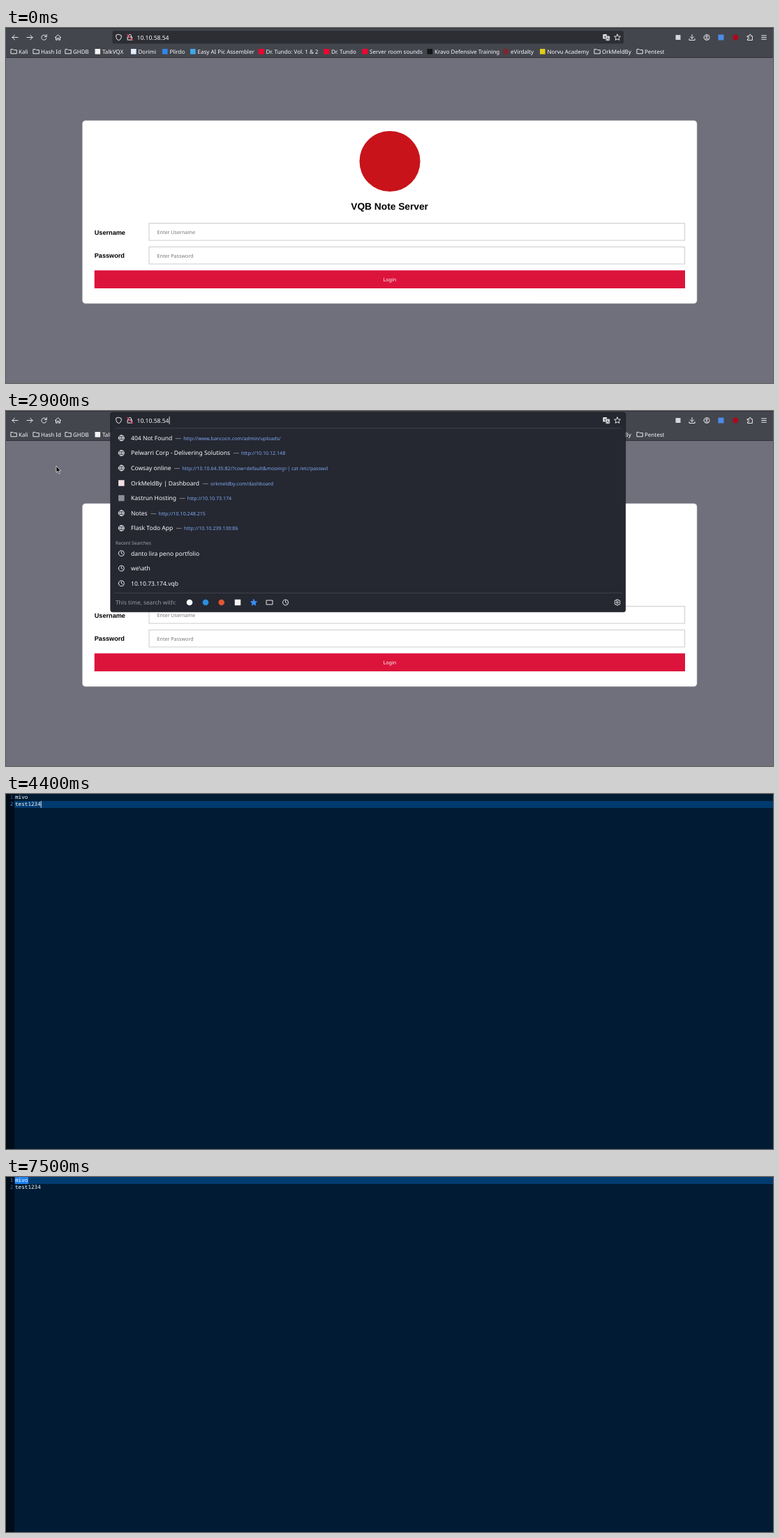
An HTML page that plays this animation: 1099 px wide and 510 px high, repeating every 8 s.

```html
<!DOCTYPE html>
<html lang="en">
<head>
<meta charset="utf-8">
<style>
html, body { margin: 0; width: 100%; height: 100%; overflow: hidden; background: #70707c; }
svg { display: block; width: 100%; height: 100%; }
text { font-family: "Noto Sans", sans-serif; text-rendering: geometricPrecision; white-space: pre; }
.bold { font-family: "Liberation Sans", Arial, sans-serif; font-weight: bold; }
.code { font-family: "Noto Sans Mono", monospace; font-weight: 500; }
.icon { fill: none; stroke: #e9e9ed; stroke-width: 1; stroke-linecap: round; stroke-linejoin: round; }
</style>
</head>
<body>
<svg id="stage" viewBox="0 0 1099 510" preserveAspectRatio="none"></svg>
<script>
const rect = (x, y, w, h, fill, extra = '') =>
  `<rect x="${x}" y="${y}" width="${w}" height="${h}" fill="${fill}" ${extra}/>`;
const text = (x, y, size, fill, body, extra = '') =>
  `<text x="${x}" y="${y}" font-size="${size}" fill="${fill}" ${extra}>${body}</text>`;
const icon = (x, y, d, extra = '') =>
  `<path class="icon" transform="translate(${x} ${y})" d="${d}" ${extra}/>`;
const dot = (x, y, r, fill) => `<circle cx="${x}" cy="${y}" r="${r}" fill="${fill}"/>`;
const square = (x, y, size, fill) => rect(x - size / 2, y - size / 2, size, size, fill);
const group = (id, body) => `<g id="${id}">${body}</g>`;

const shapes = {
  back: 'M4 0H-4M-.7-3.4L-4 0L-.7 3.4',
  forward: 'M-4 0H4M.7-3.4L4 0L.7 3.4',
  reload: 'M3.4-1A3.6 3.6 0 1 0 3.4 1.3M3.7-4V-1H.8',
  home: 'M-4 0L0-3.8L4 0M-3-.8V3.7H-1V1H1V3.7H3V-.8',
  shield: 'M0-4.2L3.7-3V0Q3.4 3 0 4.3Q-3.4 3-3.7 0V-3Z',
  lock: 'M-3-.5H3V3.8H-3ZM-2-.5V-2A2 2 0 0 1 2-2V-.5',
  star: 'M0-4.3L1.3-1.4L4.4-1.1L2.1 1L2.7 4.1L0 2.5L-2.7 4.1L-2.1 1L-4.4-1.1L-1.3-1.4Z',
  download: 'M0-4V1.6M-2.6-.8L0 1.8L2.6-.8M-4 2V4H4V2',
  account: 'M-4 0A4 4 0 1 0 4 0A4 4 0 1 0-4 0M-1.3-1.2A1.3 1.3 0 1 0 1.3-1.2A1.3 1.3 0 1 0-1.3-1.2M-2.4 2.6Q0 .4 2.4 2.6',
  puzzle: 'M-3.5-2H-1V-3A1.2 1.2 0 0 1 1.4-3V-2H3.4V4H-3.5V2H-2.4A1.2 1.2 0 0 0-2.4-.4H-3.5Z',
  menu: 'M-3.3-2.7H3.3M-3.3 0H3.3M-3.3 2.7H3.3',
  folder: 'M-4-3H-1L0-2H4V3.2H-4Z',
  globe: 'M-4 0A4 4 0 1 0 4 0A4 4 0 1 0-4 0ZH4M0-4Q-3.6 0 0 4Q3.6 0 0-4',
  clock: 'M-4 0A4 4 0 1 0 4 0A4 4 0 1 0-4 0M0-2.4V0L1.6 1',
  tab: 'M-4.3-3H4.3V3H-4.3Z',
  gear: 'M-1.3 0A1.3 1.3 0 1 0 1.3 0A1.3 1.3 0 1 0-1.3 0M-1-4H1L1.4-2.8L3-3.2L4-1.3L3.1 0L4 1.3L3 3.2L1.4 2.8L1 4H-1L-1.4 2.8L-3 3.2L-4 1.3L-3.1 0L-4-1.3L-3-3.2L-1.4-2.8Z'
};

// Bookmarks: text start, label, icon colour (none for a folder)
const bookmarks = [
  [18, 'Kali'], [50, 'Hash Id'], [96, 'GHDB'],
  [138, 'TalkVQX', '#f4f4f4'], [189.5, 'Dorimi', '#e3edfb'], [234.5, 'Plirdo', '#2f86e8'],
  [274.5, 'Easy AI Pic Assembler', '#3fa9e8'], [372.5, 'Dr. Tundo: Vol. 1 &amp; 2', '#f5042f'],
  [466, 'Dr. Tundo', '#f5042f'], [521, 'Server room sounds', '#f5042f'],
  [614, 'Kravo Defensive Training', '#151518'], [723, 'eVirdalty', '#7a2633'],
  [775.5, 'Norvu Academy', '#e2cc1c'], [854, 'OrkMeldBy'], [915, 'Pentest']
];

const visited = [
  ['404 Not Found', 'http://www.bancocn.com/admin/uploads/'],
  ['Pelwarri Corp - Delivering Solutions', 'http://10.10.12.148'],
  ['Cowsay online', 'http://10.10.64.35:82/?cow=default&amp;mooing=| cat /etc/passwd'],
  ['OrkMeldBy | Dashboard', 'orkmeldby.com/dashboard', '#f3dfe1'],
  ['Kastrun Hosting', 'http://10.10.73.174', '#8d8f98'],
  ['Notes', 'http://10.10.248.215'],
  ['Flask Todo App', 'http://10.10.239.130:86']
];
const searches = ['danto lira peno portfolio', 'we\\ath', '10.10.73.174.vqb'];

const white = '#fbfbfe';

function toolbar() {
  const buttons = [
    [13, 'back'], [34, 'forward'], [54.5, 'reload'], [74.5, 'home'], [983, 'download'],
    [1004, 'account'], [1066, 'puzzle'], [1086, 'menu']
  ];
  return rect(0, 0, 1099, 42.5, '#44464d') + rect(0, 0, 1099, 1, '#33353c') +
    rect(0, 42, 1099, 1, '#303239') +
    rect(152.5, 4, 732.5, 18.5, '#2d2e34', 'rx="2.5"') +
    buttons.map(([x, name]) => icon(x, 13.5, shapes[name])).join('') +
    square(963, 13.5, 7, '#d5d5da') + square(1024.5, 13.5, 8, '#4b8bea') + dot(1045.3, 13.5, 4, '#a80a1c') +
    bookmarks.map(([x, label, color]) =>
      (color ? square(x - 6.7, 33.8, 7.6, color) : icon(x - 6.7, 33.6, shapes.folder)) +
      text(x, 36.7, 8, white, label)).join('');
}

function form() {
  const field = (y, name) =>
    text(126.7, y + 15.9, 9.16, '#000', name, 'class="bold"') +
    rect(205, y, 767.5, 24.5, '#fff', 'stroke="#ccc" stroke-width="1"') +
    text(216.5, y + 15.3, 7.15, '#757575', 'Enter ' + name);
  return rect(109.5, 133, 880.5, 262.8, '#fff', 'rx="4.5" stroke="#c8c8cc" stroke-width=".6"') +
    dot(550, 191.5, 43.5, '#c8131a') +
    text(549.6, 261, 13.74, '#000', 'VQB Note Server', 'class="bold" text-anchor="middle"') +
    field(280.6, 'Username') + field(314.5, 'Password') +
    rect(126.7, 348.2, 846.3, 25.8, '#dc143c') +
    text(549.8, 364.3, 7.15, '#fff', 'Login', 'text-anchor="middle"');
}

function dropdown() {
  const row = 21.58;
  const footer = [[263, 'white'], [286, '#2b8fe0'], [308.7, '#de5833']];
  return rect(149.7, 2, 738, 286.7, '#252731', 'rx="3" stroke="#15161c" stroke-width=".6"') +
    rect(157, 24.5, 724, .7, '#4a4c56') + rect(155, 261, 728, .7, '#4a4c56') +
    visited.map(([title, url, color], i) => {
      const y = 38.8 + i * row;
      return (color ? square(165.3, y, 8.5, color) : icon(165.3, y, shapes.globe, 'stroke-width=".8"')) +
        text(179, y + 3.1, 8.55, white, title +
          `<tspan dx="4.3" fill="#a9aab2">—</tspan><tspan dx="3" font-size="7.1" fill="#7da9ee">${url}</tspan>`);
    }).join('') +
    text(157, 192, 6.65, '#a5a6ae', 'Recent Searches') +
    searches.map((term, i) => {
      const y = 204.5 + i * row;
      return icon(165.3, y, shapes.clock) + text(179, y + 3.1, 8.55, white, term);
    }).join('') +
    text(157, 278, 8.3, '#9a9ba4', 'This time, search with:') +
    footer.map(([x, color]) => dot(x, 275, 4.3, color)).join('') + square(332, 275, 8.5, '#f2f2f2') +
    icon(355, 275, shapes.star, 'style="fill:#3b8cf5;stroke:#3b8cf5"') +
    icon(377.7, 275, shapes.tab) + icon(400.5, 275, shapes.clock) + icon(876, 275, shapes.gear);
}

function address() {
  return icon(161.5, 13.5, shapes.shield) + icon(177.5, 13.3, shapes.lock) +
    icon(177.5, 13.5, 'M-4-4L4 4', 'style="stroke:#e8355a;stroke-width:1.2"') +
    rect(855.3, 9, 5.8, 6.5, '#e9e9ed', 'rx=".8"') + text(856.4, 14.3, 5.5, '#2d2e34', 'x') +
    rect(859.2, 11.2, 6, 7, '#e9e9ed', 'rx=".8" stroke="#2d2e34" stroke-width=".6"') +
    text(860.2, 17, 6, '#2d2e34', 'A') +
    icon(876, 13.3, shapes.star) +
    rect(187.5, 7.5, 46.5, 11.5, '#2a6fdb', 'id="urlMark"') +
    text(187.5, 16.7, 8.55, white, '10.10.58.54') +
    rect(233.7, 8, .8, 11, white, 'id="urlCaret"');
}

function editor() {
  const line = (y, n, word) =>
    text(5.7, y, 7.67, '#3c7fc8', n, `class="code" id="num${n}"`) +
    text(13, y, 7.67, '#fff', word, 'class="code"');
  return rect(0, 0, 1099, 510, '#001b33') + rect(0, 0, 12, 510, '#000c18') +
    rect(12, 0, 1087, 10, '#003b70', 'id="active"') +
    rect(13, 0, 19, 10, '#2080ee', 'id="mark"') +
    line(7.2, 1, 'mivo') + line(17.4, 2, 'test1234') +
    rect(36.3, 0, .8, 10, '#fff', 'id="caret"');
}

stage.innerHTML =
  group('browser', rect(0, 0, 1099, 510, '#70707c') + form() + toolbar() + group('panel', dropdown()) + address()) +
  group('notes', editor()) +
  '<path id="arrow" fill="#000" stroke="#fff" stroke-width=".7" d="M0 0V9.3L2.1 7.4L3.6 11L5.1 10.3L3.7 6.9H6.5Z"/>' +
  '<path id="beam" fill="none" d="M-2.2-5H-.6Q0-5 0-4.3Q0-5 .6-5H2.2M0-4.5V4.5M-2.2 5H-.6Q0 5 0 4.3Q0 5 .6 5H2.2"/>';

const $ = id => document.getElementById(id);
const show = (id, on) => $(id).setAttribute('display', on ? 'inline' : 'none');
const set = (id, attrs) => { for (const key in attrs) $(id).setAttribute(key, attrs[key]); };
beam.outerHTML = '<g id="beam">' + [['#111', 2.2], ['#fff', .9]].map(([color, width]) =>
  beam.outerHTML.replace('id="beam"', `stroke="${color}" stroke-width="${width}"`)).join('') + '</g>';

// Pointer visits: each is a run of [time, x, y]; the pointer hides after its end
const visits = [
  { end: 3400, keys: [[200, 472, 455], [300, 388, 270], [400, 388, 270], [700, 313, 78], [800, 313, 78],
    [1200, 266, 24], [1500, 243, 11], [1600, 238, 11], [1700, 188, 12], [1900, 161, 6], [2000, 161, 6],
    [2300, 236, 11], [2400, 241, 11], [2600, 180, 32], [2900, 72, 79], [3100, 72, 79], [3300, 140, 18]] },
  { end: 7500, keys: [[4700, 110, 45], [5000, 62, 24], [5200, 43, 7], [5300, 41, 6], [5500, 30, 6],
    [5700, 1, 5], [5800, 1, 5], [6300, 147, 6], [6400, 147, 6], [6700, 32, 4], [6900, 22, 4],
    [7200, 21, 4], [7400, 97, 3]] }
];

function pointerAt(t) {
  const visit = visits.find(v => t >= v.keys[0][0] && t < v.end);
  if (!visit) return null;
  const next = visit.keys.findIndex(k => k[0] > t);
  if (next < 0) return visit.keys.at(-1).slice(1);
  const [a, b] = [visit.keys[next - 1], visit.keys[next]];
  const p = (t - a[0]) / (b[0] - a[0]);
  return [a[1] + (b[1] - a[1]) * p, a[2] + (b[2] - a[2]) * p];
}

function draw(now) {
  const t = Math.floor(now % 8000 / 100) * 100;
  const within = (from, to) => t >= from && t < to;
  const inEditor = t >= 4400;
  show('browser', !inEditor);
  show('notes', inEditor);

  show('panel', within(1600, 3100));
  show('urlMark', within(1700, 2400));
  show('urlCaret', within(1600, 1700) || within(2400, 3100));

  const first = t >= 5200;
  set('active', { y: first ? 0 : 10 });
  set('num1', { fill: first ? '#3d8df5' : '#2c69b0' });
  set('num2', { fill: first ? '#2c69b0' : '#3d8df5' });
  set('caret', { x: first ? 36.3 : 49.8, y: first ? 0 : 10 });
  show('caret', !within(5500, 6400) && t < 6900);
  show('mark', within(5500, 6400) || t >= 6900);
  set('mark', { width: t < 6900 ? 23 : 19 });

  const at = pointerAt(t);
  const typing = within(1200, 2500) || within(4700, 5700) || t >= 6000;
  show('beam', at && typing);
  show('arrow', at && !typing);
  if (at) set(typing ? 'beam' : 'arrow', { transform: `translate(${at})` });
}

const start = performance.now();
(function tick() {
  draw(performance.now() - start);
  requestAnimationFrame(tick);
})();
</script>
</body>
</html>
```
